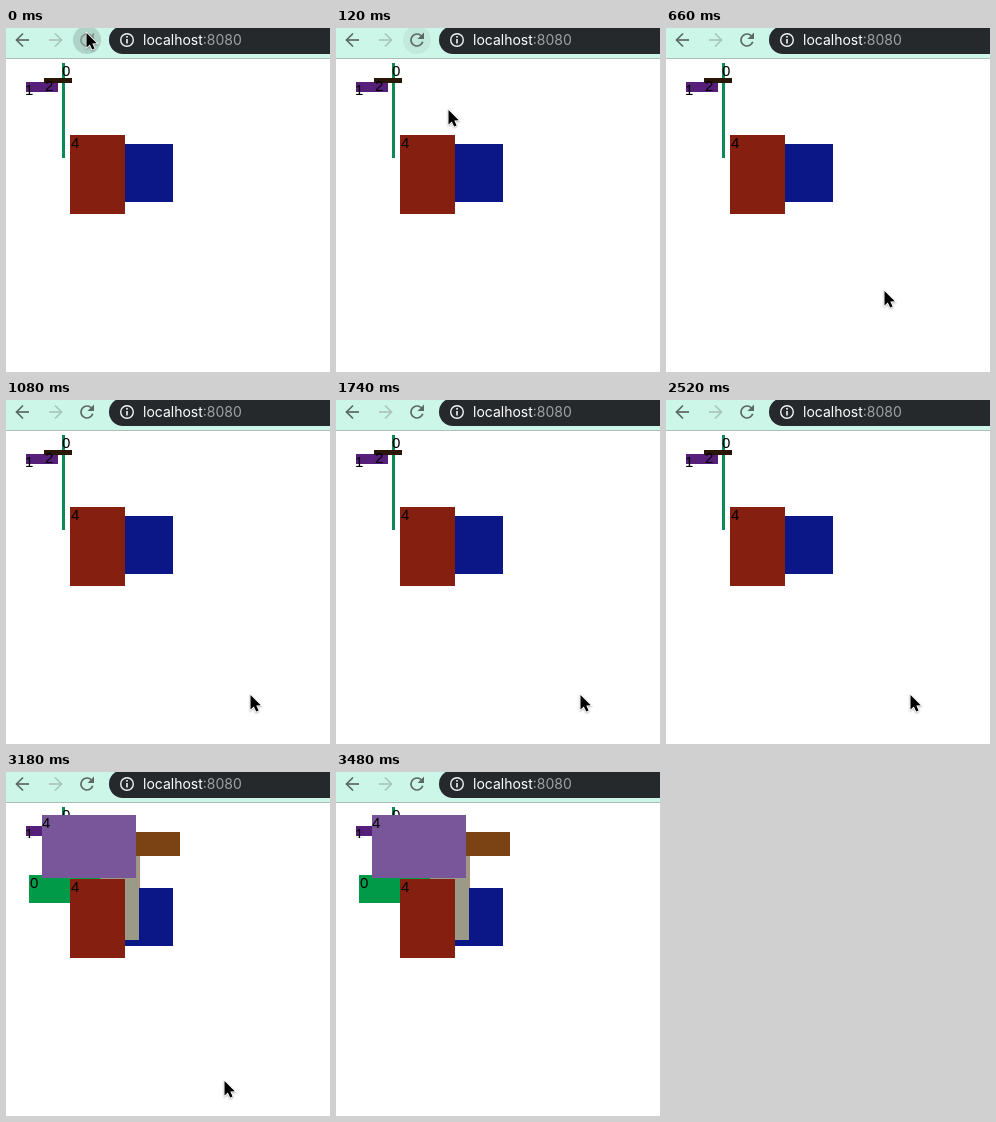
Recreate the animation shown at these times as an HTML page with a canvas. Size 324x344 px, loop 3540 ms.

```html
<!DOCTYPE html>
<html lang="en">
<head>
<meta charset="utf-8">
<title>Rectangles</title>
<style>
  html, body { margin: 0; width: 100%; height: 100%; overflow: hidden; background: #fff; }
  canvas { display: block; width: 324px; height: 344px; }
</style>
</head>
<body>
<canvas id="stage" width="324" height="344"></canvas>
<script>
const ctx = document.getElementById('stage').getContext('2d');
const LOOP = 3540, STEP = 60, SWAP = 2580;

// Pointer tip: time, x, y
const path = [
  [0, 80, 5], [60, 85, 16], [120, 112, 82], [180, 153, 163],
  [240, 184, 219], [300, 195, 237], [540, 196, 238], [600, 206, 249],
  [660, 218, 263], [780, 236, 287], [900, 243, 297], [1080, 244, 295],
  [3120, 244, 295], [3180, 218, 309], [3240, 168, 335], [3300, 140, 362],
  [LOOP, 140, 362]
];

function pointerAt(t) {
  const i = path.findIndex(p => p[0] > t);
  const [t0, x0, y0] = path[i - 1], [t1, x1, y1] = path[i];
  const k = (t - t0) / (t1 - t0);
  return [Math.round(x0 + (x1 - x0) * k), Math.round(y0 + (y1 - y0) * k)];
}

function rect(x, y, right, bottom, color) {
  ctx.fillStyle = color;
  ctx.fillRect(x, y, right - x, bottom - y);
}

function label(text, x, y) {
  ctx.font = '15px "Liberation Sans", Arial, sans-serif';
  ctx.fillStyle = '#000';
  ctx.fillText(text, x, y);
}

function line(points, color, width = 1.7) {
  ctx.strokeStyle = color;
  ctx.lineWidth = width;
  ctx.beginPath();
  points.forEach(([x, y]) => ctx.lineTo(x, y));
  ctx.stroke();
}

function disc(x, y, r, color) {
  ctx.fillStyle = color;
  ctx.beginPath();
  ctx.arc(x, y, r, 0, Math.PI * 2);
  ctx.fill();
}

function arrow(x, dir, color) {
  line([[x - 7 * dir, 12], [x + 6 * dir, 12]], color);
  line([[x, 5.5], [x - 6.5 * dir, 12], [x, 18.5]], color);
}

function reload(color) {
  ctx.strokeStyle = color;
  ctx.lineWidth = 1.7;
  ctx.beginPath();
  ctx.arc(81, 12, 6, 0.3, Math.PI * 1.75);
  ctx.stroke();
  ctx.fillStyle = color;
  ctx.beginPath();
  ctx.moveTo(88, 4.5);
  ctx.lineTo(88, 11);
  ctx.lineTo(81.5, 11);
  ctx.fill();
}

function toolbar(t) {
  rect(0, 0, 324, 30, '#cbf6e8');
  rect(0, 30, 324, 31, '#aebbb6');
  arrow(17, 1, '#5c6864');
  arrow(49, -1, '#a9c6bc');
  const hover = Math.max(0, 1 - t / 180);
  if (hover) disc(81, 12, 14, `rgba(130, 155, 146, ${0.38 * hover})`);
  reload(t < STEP ? '#84948e' : '#5c6864');

  ctx.fillStyle = '#25292c';
  ctx.beginPath();
  ctx.roundRect(103, -2, 260, 28, 14);
  ctx.fill();
  ctx.strokeStyle = '#f1f3f4';
  ctx.lineWidth = 1.4;
  ctx.beginPath();
  ctx.arc(121, 12, 6.3, 0, Math.PI * 2);
  ctx.stroke();
  rect(120.2, 8, 121.8, 9.7, '#f1f3f4');
  rect(120.2, 11, 121.8, 15.5, '#f1f3f4');

  ctx.font = '14px Inter, sans-serif';
  ctx.fillStyle = '#fff';
  ctx.fillText('localhost', 137, 17);
  const w = ctx.measureText('localhost').width;
  ctx.fillStyle = '#9da2a5';
  ctx.fillText(':8080', 137 + w, 17);
}

function shapes(swapped) {
  rect(56, 35, 59, 130, '#0b8a58');
  rect(20, 54, 52, 64, '#561f79');
  rect(38, 50, 66, 55, '#2a1606');
  label('0', 56, 48);
  label('1', 19, 67);
  label('2', 39, 63);
  rect(100, 116, 167, 174, '#0b1687');
  if (swapped) {
    // Clears what the new set covers
    rect(20, 66, 66, 131, '#fff');
    rect(130, 60, 174, 84, '#7b4313');
    rect(94, 84, 133, 168, '#9b9a86');
    rect(133, 84, 134, 116, '#b58f70');
    rect(23, 103, 94, 131, '#009a49');
    label('0', 24, 116);
    rect(36, 43, 130, 106, '#785699');
    label('4', 36, 56);
  }
  rect(64, 107, 119, 186, '#852010');
  label('4', 65, 120);
}

function pointer(x, y) {
  ctx.save();
  ctx.translate(x, y);
  ctx.beginPath();
  [[0.5, 0], [0.5, 14.5], [3.8, 11.4], [6.2, 16.5], [8.6, 15.4], [6.3, 10.4], [10.8, 10.3]]
    .forEach(([px, py]) => ctx.lineTo(px, py));
  ctx.closePath();
  ctx.shadowColor = 'rgba(0, 0, 0, 0.3)';
  ctx.shadowBlur = 2;
  ctx.shadowOffsetY = 1;
  ctx.strokeStyle = '#fff';
  ctx.lineWidth = 1.6;
  ctx.stroke();
  ctx.shadowColor = 'transparent';
  ctx.fillStyle = '#000';
  ctx.fill();
  ctx.restore();
}

function draw(time) {
  const t = Math.floor((time % LOOP) / STEP) * STEP;
  rect(0, 0, 324, 344, '#fff');
  toolbar(t);
  shapes(t >= SWAP);
  pointer(...pointerAt(t));
}

let start;
function tick(now) {
  start ??= now;
  draw(now - start);
  requestAnimationFrame(tick);
}
draw(0);
requestAnimationFrame(tick);
</script>
</body>
</html>
```
